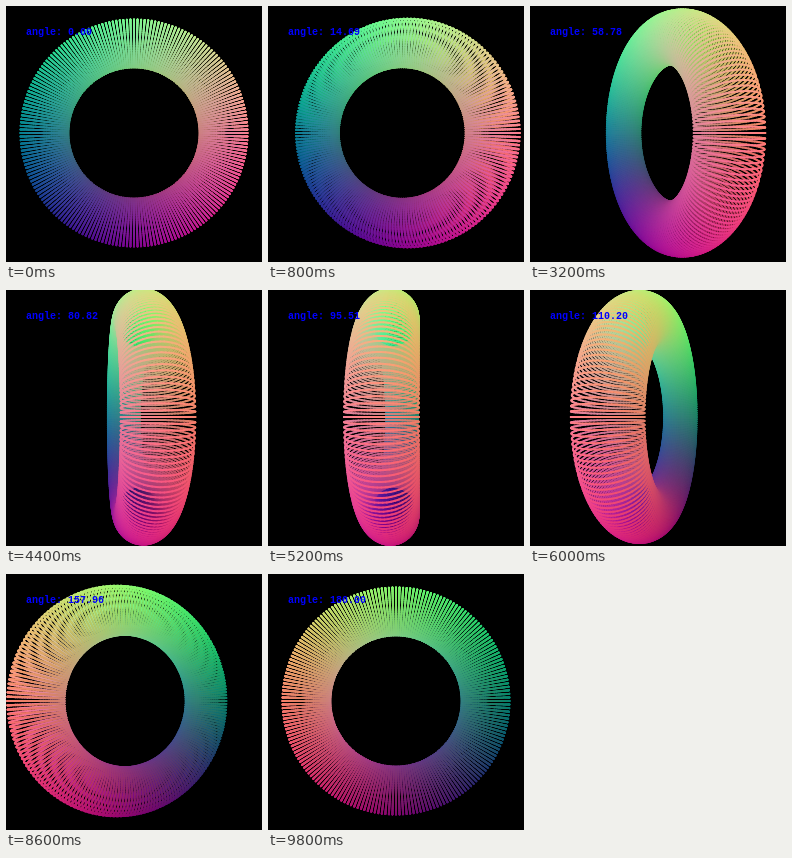
Animation, 256 px wide and 256 px high, one loop 10 s. Source, as an HTML page with a canvas:

```html
<!DOCTYPE html>
<html lang="en">
<head>
<meta charset="utf-8">
<title>Turning torus</title>
<style>
html, body { margin: 0; width: 100%; height: 100%; overflow: hidden; background: #000; }
canvas { display: block; width: 256px; height: 256px; }
</style>
</head>
<body>
<canvas id="stage" width="256" height="256"></canvas>
<script>
const SIZE = 256, STEPS = 50, STEP_MS = 200;
const RINGS = 200, SEGMENTS = 60;
const MAJOR = 0.8, MINOR = 0.2, CAMERA = 2;
const FOCAL = SIZE / 2 / Math.tan(Math.PI / 6);
const CX = 128, CY = 127;
const TURN = Math.PI * 2;

const ctx = document.getElementById('stage').getContext('2d');

const channel = v => Math.round(127.5 + 127.5 * v);

function torusPoint(theta, phi) {
  const rad = MAJOR + MINOR * Math.cos(phi);
  const x = rad * Math.cos(theta), y = rad * Math.sin(theta), z = MINOR * Math.sin(phi);
  return { x, y, z, color: `rgb(${channel(x)},${channel(y)},${channel(z)})` };
}

const rings = Array.from({ length: RINGS }, (_, i) =>
  Array.from({ length: SEGMENTS + 1 }, (_, k) =>
    torusPoint(i / RINGS * TURN, k / SEGMENTS * TURN)));

// Turn about the vertical axis, then project in perspective.
function project(p, sinA, cosA) {
  const depth = CAMERA - p.x * sinA - p.z * cosA;
  return {
    x: CX + FOCAL * (p.x * cosA - p.z * sinA) / depth,
    y: CY - FOCAL * p.y / depth,
    depth,
    color: p.color
  };
}

function visibleSegments(angle) {
  const sinA = Math.sin(angle), cosA = Math.cos(angle);
  const list = [];
  for (const ring of rings) {
    const points = ring.map(p => project(p, sinA, cosA));
    for (let k = 0; k < SEGMENTS; k++) {
      const a = points[k], b = points[k + 1];
      list.push({ a, b, depth: a.depth + b.depth });
    }
  }
  return list.sort((s, t) => t.depth - s.depth);
}

function draw(step) {
  const degrees = step * 180 / (STEPS - 1);
  ctx.fillStyle = '#000';
  ctx.fillRect(0, 0, SIZE, SIZE);
  ctx.lineWidth = 2;
  ctx.lineCap = 'round';
  for (const { a, b } of visibleSegments(degrees * Math.PI / 180)) {
    ctx.strokeStyle = a.color;
    ctx.beginPath();
    ctx.moveTo(a.x, a.y);
    ctx.lineTo(b.x, b.y);
    ctx.stroke();
  }
  ctx.font = 'bold 10px "Liberation Mono", monospace';
  ctx.fillStyle = '#00f';
  ctx.fillText('angle: ' + degrees.toFixed(2), 20, 29);
}

let shown = -1;
function tick() {
  const step = Math.floor(performance.now() / STEP_MS) % STEPS;
  if (step !== shown) draw(shown = step);
  requestAnimationFrame(tick);
}
tick();
</script>
</body>
</html>
```
